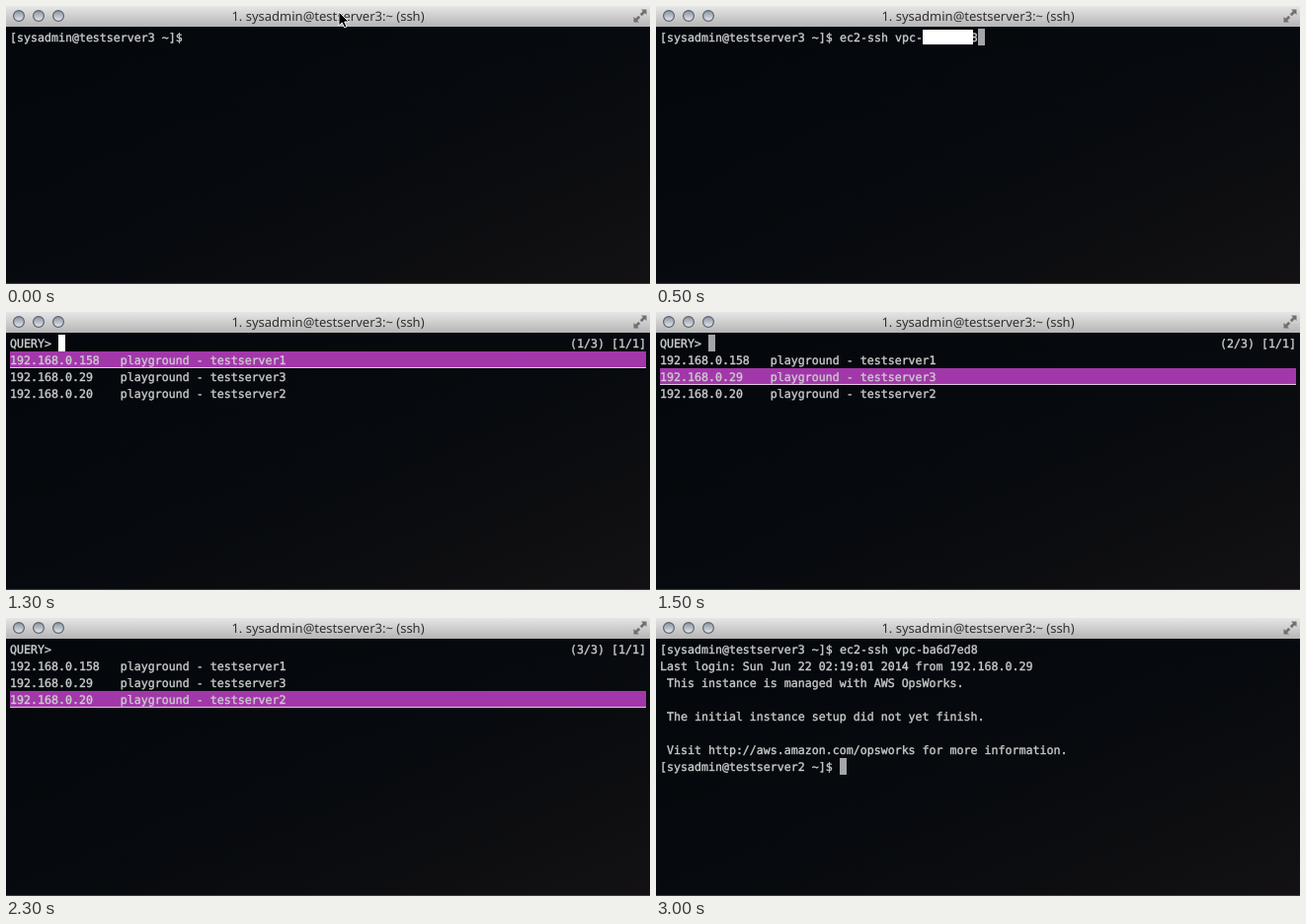
These frames come from a looping animation (652 px wide and 282 px high, 3500 ms). An HTML page:

```html
<!DOCTYPE html>
<html lang="en">
<head>
<meta charset="utf-8">
<title>Terminal session</title>
<style>
  html, body { margin: 0; width: 100%; height: 100%; overflow: hidden; background: #05090d; }
  svg { display: block; width: 652px; height: 282px; }
  text {
    font: 11.627px "DejaVu Sans Mono", monospace;
    white-space: pre; text-rendering: geometricPrecision;
    fill: #cbcccd; stroke: #cbcccd; stroke-width: .35px;
  }
  .title { font: 13px "Noto Sans", sans-serif; fill: #303030; stroke: none; text-anchor: middle; }
  .caret { fill: #a3a5a8; }
  .bar { fill: #a237aa; }
  .rule { fill: #e3c9e4; }

  /* Each scene holds one seventh of the loop. */
  .scene {
    visibility: hidden;
    animation: show 3.5s step-end infinite;
    animation-delay: calc(var(--i) * .5s - 3.5s);
  }
  @keyframes show {
    0% { visibility: visible; }
    14.2857%, 100% { visibility: hidden; }
  }
</style>
</head>
<body>
<svg viewBox="0 0 652 282">
  <defs>
    <linearGradient id="chrome" x2="0" y2="1">
      <stop stop-color="#e6e6e6"/>
      <stop offset="1" stop-color="#b5b5b5"/>
    </linearGradient>
    <linearGradient id="glass" x2="1" y2="1">
      <stop stop-color="#03070b"/>
      <stop offset=".55" stop-color="#070a0e"/>
      <stop offset="1" stop-color="#131113"/>
    </linearGradient>
    <linearGradient id="bead" x2="0" y2="1">
      <stop stop-color="#8b929c"/>
      <stop offset=".45" stop-color="#b3b9c1"/>
      <stop offset="1" stop-color="#e6eaee"/>
    </linearGradient>
    <g id="prompt"><text x="4" y="36">[sysadmin@testserver3 ~]$</text></g>
    <g id="command"><use href="#prompt"/><text x="186" y="36">ec2-ssh vpc-ba6d7ed8</text></g>
    <g id="hosts">
      <text x="4" y="36">QUERY&gt;</text>
      <text x="4" y="53">192.168.0.158   playground - testserver1</text>
      <text x="4" y="70">192.168.0.29    playground - testserver3</text>
      <text x="4" y="87">192.168.0.20    playground - testserver2</text>
    </g>
    <g id="pick">
      <rect class="bar" x="4" y="40" width="644" height="16"/>
      <rect class="rule" x="4" y="56" width="644" height="1"/>
    </g>
    <rect id="caret" width="7" height="17"/>
  </defs>

  <rect width="652" height="282" fill="url(#glass)"/>
  <rect y="281" width="652" height="1" fill="#3a3b3d"/>
  <rect width="652" height="21" fill="url(#chrome)"/>

  <g fill="url(#bead)" stroke="#59626e" stroke-width="1.2">
    <circle cx="13" cy="10" r="5.4"/>
    <circle cx="33" cy="10" r="5.4"/>
    <circle cx="53" cy="10" r="5.4"/>
  </g>
  <text class="title" x="326" y="15">1. sysadmin@testserver3:~ (ssh)</text>
  <path d="M643 3.5h5.5V9l-1.8-1.8-3 3-1.9-1.9 3-3zM641 16.5h-5.5V11l1.8 1.8 3-3 1.9 1.9-3 3z"
        fill="#707070"/>

  <g class="scene" style="--i:0">
    <use href="#prompt"/>
    <path d="M337 6v14l3.3-3.1 2.3 5.1 2.3-1-2.2-5h4.3z" fill="#000" stroke="#fff" stroke-width=".9"/>
  </g>
  <g class="scene" style="--i:1">
    <use href="#command"/>
    <rect x="270" y="24" width="51" height="15" fill="#fff"/>
    <use href="#caret" class="caret" x="326" y="23"/>
  </g>
  <g class="scene" style="--i:2">
    <use href="#pick"/>
    <use href="#hosts"/>
    <text x="571" y="36">(1/3) [1/1]</text>
    <use href="#caret" fill="#fff" x="53" y="23"/>
  </g>
  <g class="scene" style="--i:3">
    <use href="#pick" y="17"/>
    <use href="#hosts"/>
    <text x="571" y="36">(2/3) [1/1]</text>
    <use href="#caret" class="caret" x="53" y="23"/>
  </g>
  <g class="scene" style="--i:4">
    <use href="#pick" y="34"/>
    <use href="#hosts"/>
    <text x="571" y="36">(3/3) [1/1]</text>
  </g>
  <g class="scene" style="--i:5">
    <use href="#command"/>
    <use href="#caret" class="caret" x="4" y="40"/>
  </g>
  <g class="scene" style="--i:6">
    <use href="#command"/>
    <text x="4" y="53">Last login: Sun Jun 22 02:19:01 2014 from 192.168.0.29</text>
    <text x="4" y="70"> This instance is managed with AWS OpsWorks.</text>
    <text x="4" y="104"> The initial instance setup did not yet finish.</text>
    <text x="4" y="138"> Visit http://aws.amazon.com/opsworks for more information.</text>
    <text x="4" y="155">[sysadmin@testserver2 ~]$</text>
    <use href="#caret" class="caret" x="186" y="142"/>
  </g>
</svg>
</body>
</html>
```
